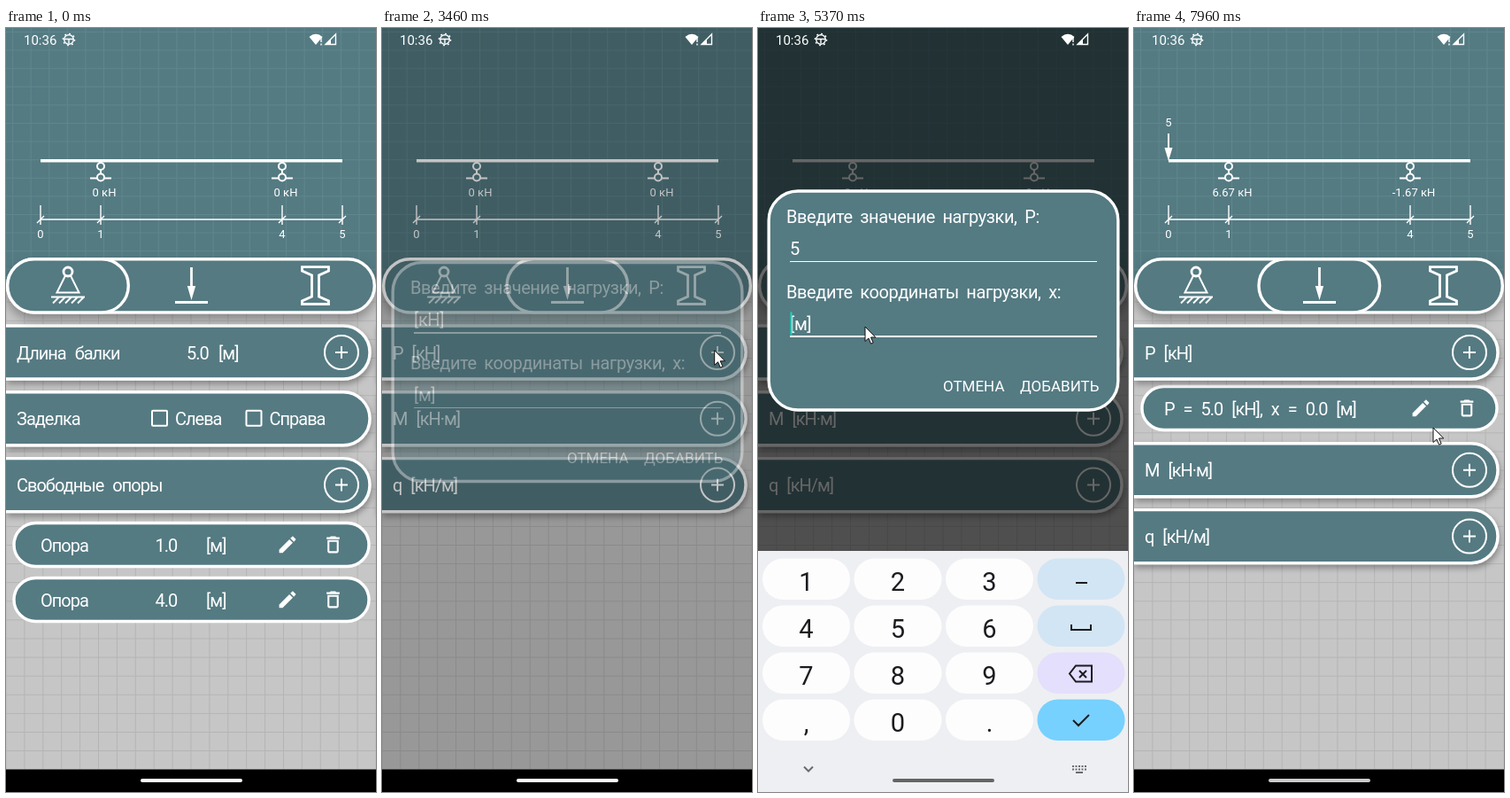
Write an HTML page that moves like this. It is 418 px wide and 862 px high and loops after 7.99 s.

```html
<!DOCTYPE html>
<html lang="ru">
<head>
<meta charset="utf-8">
<title>Расчёт балки</title>
<style>
html, body { margin: 0; width: 100%; height: 100%; overflow: hidden; background: #000; }
svg { display: block; width: 100vw; height: 100vh; }
text { font-family: Roboto, "Noto Sans", sans-serif; fill: #fff; }
.list { font-size: 20px; letter-spacing: -1px; word-spacing: 6px; }
.form { font-size: 20px; letter-spacing: -.4px; word-spacing: 4px; }
.btn { font-size: 17px; }
.dim { font-size: 13px; text-anchor: middle; }
.key { font-size: 29px; text-anchor: middle; fill: #1b1c1f; }
.mid { text-anchor: middle; }
.ln { fill: none; stroke: #fff; stroke-width: 2; }
.thin { stroke-width: 1.4; }
.bold { stroke-width: 2.8; }
.ink { fill: none; stroke: #1b1c1f; stroke-width: 2; }
.soft { stroke: #6a6b70; }
.box { fill: #547a82; stroke: #fff; stroke-width: 3.4; }
.fill { fill: #fff; }
</style>
</head>
<body>
<svg id="stage" viewBox="0 0 418 862" preserveAspectRatio="none"></svg>
<script>
const LOOP = 7990, W = 418;
const stage = document.getElementById('stage');

// Markup helpers
const text = (cls, x, y, s, extra = '') => `<text class="${cls}" x="${x}" y="${y}" ${extra}>${s}</text>`;
const path = (d, cls = 'ln', extra = '') => `<path class="${cls}" d="${d}" ${extra}/>`;
const circle = (x, y, r, cls = 'ln', extra = '') => `<circle class="${cls}" cx="${x}" cy="${y}" r="${r}" ${extra}/>`;
const rect = (x, y, w, h, r, extra) => `<rect x="${x}" y="${y}" width="${w}" height="${h}" rx="${r}" ${extra}/>`;
const group = (id, body) => `<g id="${id}">${body}</g>`;
const range = n => [...Array(n).keys()];

const grid = (id, w, h, x, y, color) => `<pattern id="${id}" x="${x}" y="${y}" width="${w}" height="${h}"
  patternUnits="userSpaceOnUse">${path(`M.5 0V${h}M0 .5H${w}`, '', `stroke="${color}" fill="none"`)}</pattern>`;

const plus = y => circle(379, y, 19) + path(`M372 ${y}h14M379 ${y - 7}v14`);
const pencil = (x, y) => path('M3 17.25V21h3.75L17.81 9.94l-3.75-3.75zM20.71 7.04c.39-.39.39-1.02 0-1.41l-2.34-2.34c-.39-.39-1.02-.39-1.41 0l-1.83 1.83 3.75 3.75z',
  'fill', `transform="translate(${x - 12.5} ${y - 12.5}) scale(1.04)"`);
const bin = (x, y) => path('M6 19c0 1.1.9 2 2 2h8c1.1 0 2-.9 2-2V7H6zM8 9h8v10H8zM15.5 4l-1-1h-5l-1 1H5v2h14V4z',
  'fill', `fill-rule="evenodd" transform="translate(${x - 12.6} ${y - 12.6}) scale(1.05)"`);

// List rows, placed by their centre line
const ROWS = [366, 440.8, 515.6];
const row = (y, body) => path(`M0 ${y - 30}H381a30 30 0 0 1 0 60H0`, 'box', 'filter="url(#low)"') + body;
const titleRow = (y, s) => row(y, text('list', 12, y + 7.5, s) + plus(y));
const subRow = (y, body) => rect(9, y - 24.5, 401, 49, 24.5, 'class="box"') + body;
const check = (x, y, s) => rect(x, y - 9, 17, 17, 1, 'class="ln"') + text('list', x + 26, y + 7.5, s);
const supportRow = (y, pos) => subRow(y, text('list', 39, y + 7.5, 'Опора') +
  text('list mid', 181, y + 7.5, pos) + text('list', 226, y + 7.5, '[м]') + pencil(318, y) + bin(369.5, y));

const support = (x, id) => circle(x, 156, 4) + circle(x, 168.5, 4) +
  path(`M${x} 160v4.5M${x - 12} 169.5h8M${x + 4} 169.5h8`) + text('dim', x + 4, 190, '0 кН', `id="${id}"`);
const mark = (x, s) => path(`M${x} 200v22M${x - 4} 220l8-8`, 'ln thin') + text('dim', x, 237, s);

const beam = path('M39 149.7H380', 'ln', 'style="stroke-width:3.6"') + support(107, 'r1') + support(312, 'r2') +
  path('M39 216H380', 'ln thin') + mark(39, 0) + mark(107, 1) + mark(312, 4) + mark(380, 5) +
  group('load', text('dim', 39, 111, '5') + path('M39 119V140') + path('M34.5 135h9L39 150z', 'fill'));

const tabs = rect(1.7, 260.7, 414.6, 60.2, 30.1, 'class="box" filter="url(#high)"') +
  rect(1.7, 260.7, 136.6, 60.2, 30.1, 'id="tab" class="box"') +
  circle(70, 275, 5, 'ln bold') +
  path('M67 279.5L57.5 298.5H82.5L73 279.5M51 303.5H89' + range(5).map(i => `M${60 + i * 7} 303.5l-7 7`).join('')) +
  path('M209.5 270V296M191 309.5H228', 'ln bold') + path('M204.8 291h9.4L209.5 307z', 'fill') +
  path('M334.5 269.7H364.5V274L353.5 279V303L364.5 308V311.5H334.5V308L345.5 303V279L334.5 274Z', 'ln bold');

const page1 = row(ROWS[0], text('list', 12, 373.5, 'Длина балки') + text('list', 204, 373.5, '5.0') +
    text('list', 240, 373.5, '[м]') + plus(ROWS[0])) +
  row(ROWS[1], text('list', 12, 448.3, 'Заделка') + check(165, ROWS[1], 'Слева') + check(271.5, ROWS[1], 'Справа')) +
  titleRow(ROWS[2], 'Свободные опоры') + supportRow(583, '1.0') + supportRow(645, '4.0');
const page2 = group('added', subRow(429, text('list', 34, 436.5, 'P = 5.0 [кН], x = 0.0 [м]') + pencil(324, 429) + bin(376, 429))) +
  group('rest', titleRow(ROWS[1], 'M [кН·м]') + titleRow(ROWS[2], 'q [кН/м]')) + titleRow(ROWS[0], 'P [кН]');

const dialog = rect(12.2, 264.5, 394.6, 247, 33, 'class="box"') +
  text('form', 32, 300, 'Введите значение нагрузки, P:') + text('form', 36, 336, '', 'id="in1"') + path('M36 344H383', 'ln', 'id="u1"') +
  text('form', 32, 385, 'Введите координаты нагрузки, x:') + text('form', 36, 421, '', 'id="in2"') + path('M36 428.5H383', 'ln', 'id="u2"') +
  text('btn', 209, 490.5, 'ОТМЕНА') + text('btn', 296, 490.5, 'ДОБАВИТЬ') +
  rect(36.5, 316, 2, 26, 0, 'id="caret" fill="#14d9c0"');

const tint = ['#d2e5f4', '#d2e5f4', '#e4dffc', '#76d1ff'];
const keys = ['123', '456', '789', ',0.'].map((line, r) => {
  const y = 598.5 + r * 53;
  return [...line].map((c, i) => rect(5 + i * 103.5, y, 99, 46.5, 23.2, `id="k${r}${i}" fill="#fdfdfe"`) +
    text('key', 54.5 + i * 103.5, y + 36, c)).join('') + rect(315.5, y, 99, 46.5, 23.2, `fill="${tint[r]}"`);
}).join('');
const keyboard = rect(0, 590, W, 272, 0, 'fill="#eeeff2"') + keys +
  path('M359 626h13M354 673v6h22v-6M359 719.5h18v18h-18l-7-9zM363 725l8 8m0-8l-8 8M356 781l6 6 12-12', 'ink') +
  path('M52 833.5l5 5 5-5', 'ink soft') +
  path('M355 833h16M355 836.5h16', 'ink soft', 'stroke-dasharray="2 1.5"') +
  path('M359 840h8', 'ink soft') +
  rect(0, 590, W, 272, 0, 'id="shade"');

const status = text('', 20, 18.5, '10:36', 'font-size="15"') + circle(71, 13, 5.3, 'ln thin') +
  circle(71, 13, 6.6, 'ln thin', 'stroke-dasharray="1.8 3.38"') + path('M66 12.5h10M71 12.5v5', 'ln thin') +
  path('M342.5 10Q350 3.5 357.5 10L350 19z', 'fill') + path('M356 10v6m0 1.5v2', 'ln thin') +
  path('M361 18.5L372.5 7V18.5z', 'ln thin') + path('M361 18.5L367 12.5V18.5z', 'fill');

stage.innerHTML = `<defs>
  ${grid('paper', 20.9, 21.1, -0.5, 13.3, '#b4b4b4')}${grid('sheet', 20.6, 20.6, 7, 4, '#5f858d')}
  <filter id="low" x="-10%" y="-30%" width="120%" height="170%"><feDropShadow dx="1" dy="4" stdDeviation="3.5" flood-opacity=".33"/></filter>
  <filter id="high" x="-10%" y="-30%" width="120%" height="180%"><feDropShadow dx="0" dy="7" stdDeviation="6" flood-opacity=".3"/></filter>
  <clipPath id="view"><path d="M0 0H418V836H0z"/></clipPath></defs>` +
  rect(0, 0, W, 862, 0, 'fill="#c6c6c6"') + rect(0, 0, W, 862, 0, 'fill="url(#paper)"') +
  `<g clip-path="url(#view)">${group('p1', page1)}${group('p2', page2)}</g>` +
  rect(0, 0, W, 291, 0, 'fill="#547a82"') + rect(0, 0, W, 291, 0, 'fill="url(#sheet)"') + beam + tabs +
  rect(0, 836.5, W, 26, 0, 'fill="#000"') + rect(0, 0, W, 862, 0, 'id="veil"') +
  group('dialog', dialog) + group('kb', keyboard) + rect(152, 847, 115, 4, 2, 'id="pill"') + status +
  group('mouse', path('M0 0V16.5L3.9 13 6.6 19.2 9.2 18 6.5 12H11.8Z', '', 'fill="#fff" stroke="#111"'));

const ui = {};
stage.querySelectorAll('[id]').forEach(el => ui[el.id] = el);

// Timing helpers
const clamp = u => Math.max(0, Math.min(1, u));
const prog = (t, a, b) => clamp((t - a) / (b - a));
const out = (u, n = 3) => 1 - (1 - u) ** n;
const smooth = u => u * u * (3 - 2 * u);
const mix = (a, b, u) => a + (b - a) * u;
const move = (el, x, y) => el.setAttribute('transform', `translate(${x.toFixed(2)} ${y.toFixed(2)})`);
const fade = (el, a) => el.style.opacity = a;

// Pointer stops: time, x, y
const stops = [[990, 385, 484], [1420, 219, 295], [2580, 219, 295], [2930, 376, 367], [3150, 376, 367],
  [3190, 376, 365], [3410, 376, 365], [3540, 375, 361.5], [4260, 170, 672], [4580, 160, 674], [5150, 122, 338],
  [5370, 121, 337], [5860, 152, 778], [6210, 154, 776], [6630, 336, 412], [6740, 340, 398], [7730, 340, 398], [7960, 338, 451]];

function pointer(t) {
  const i = stops.findIndex(s => s[0] > t);
  if (i < 0) return stops[stops.length - 1].slice(1);
  if (!i) return stops[0].slice(1);
  const a = stops[i - 1], b = stops[i], u = smooth(prog(t, a[0], b[0]));
  return [mix(a[1], b[1], u), mix(a[2], b[2], u)];
}

function draw(t) {
  const slide = t < 1820 ? 0 : out(prog(t, 1797, 1997), 5);
  move(ui.p1, -W * slide, 0);
  move(ui.p2, W * (1 - slide) + 1 - prog(t, 1820, 1990), 0);
  ui.tab.setAttribute('x', mix(1.7, 141, out(prog(t, 1835, 1980))));

  // Result of the new load
  const done = t >= 7130;
  fade(ui.load, done ? 1 : 0);
  ui.r1.textContent = done ? '6.67 кН' : '0 кН';
  ui.r2.textContent = done ? '-1.67 кН' : '0 кН';
  move(ui.rest, 0, 58 * smooth(prog(t, 7160, 7410)));
  fade(ui.added, prog(t, 7410, 7560));

  // Dialog window
  const close = t < 7010 ? 0 : prog(t, 7000, 7150), left = 1 - close;
  const open = prog(t, 3410, 3540);
  fade(ui.veil, .6 * open * left ** 1.5);
  fade(ui.dialog, open * left ** 3.5);
  move(ui.dialog, 0, -80.5 * smooth(prog(t, 3600, 3800)));

  const second = t >= 5280, five = t >= 4500, zero = t >= 6190;
  ui.in1.textContent = five ? '5' : '[кН]';
  ui.in2.textContent = zero ? '0' : '[м]';
  ui.u1.style.strokeWidth = second ? 1 : 2;
  ui.u2.style.strokeWidth = second ? 2 : 1;
  const since = t - (zero ? 6190 : second ? 5280 : five ? 4500 : 3470);
  fade(ui.caret, since >= 0 && since % 1000 < 500 ? 1 : 0);
  move(ui.caret, (second ? zero : five) ? 10 : 0, second ? 85 : 0);

  // Keyboard
  const rise = prog(t, 3522, 3802), fall = prog(t, 7050, 7280);
  move(ui.kb, 0, 272 * (1 - out(rise) + fall * fall));
  fade(ui.kb, clamp(rise * 2) * clamp(2 - fall * 2));
  fade(ui.shade, close ? .37 * left ** 1.5 : 0);
  const press = (el, a) => el.setAttribute('fill', t >= a && t < a + 120 ? '#d8d9de' : '#fdfdfe');
  press(ui.k11, 4420);
  press(ui.k31, 6100);

  const g = Math.round(t < 7010 ? mix(255, 100, prog(t, 3800, 4000)) : mix(mix(73, 100, close), 204, prog(t, 7730, 7960)));
  ui.pill.setAttribute('fill', `rgb(${g},${g},${g})`);

  fade(ui.mouse, t >= 990 ? 1 : 0);
  move(ui.mouse, ...pointer(t));
}

const start = performance.now();
function tick() {
  draw((performance.now() - start) % LOOP);
  requestAnimationFrame(tick);
}
tick();
</script>
</body>
</html>
```
